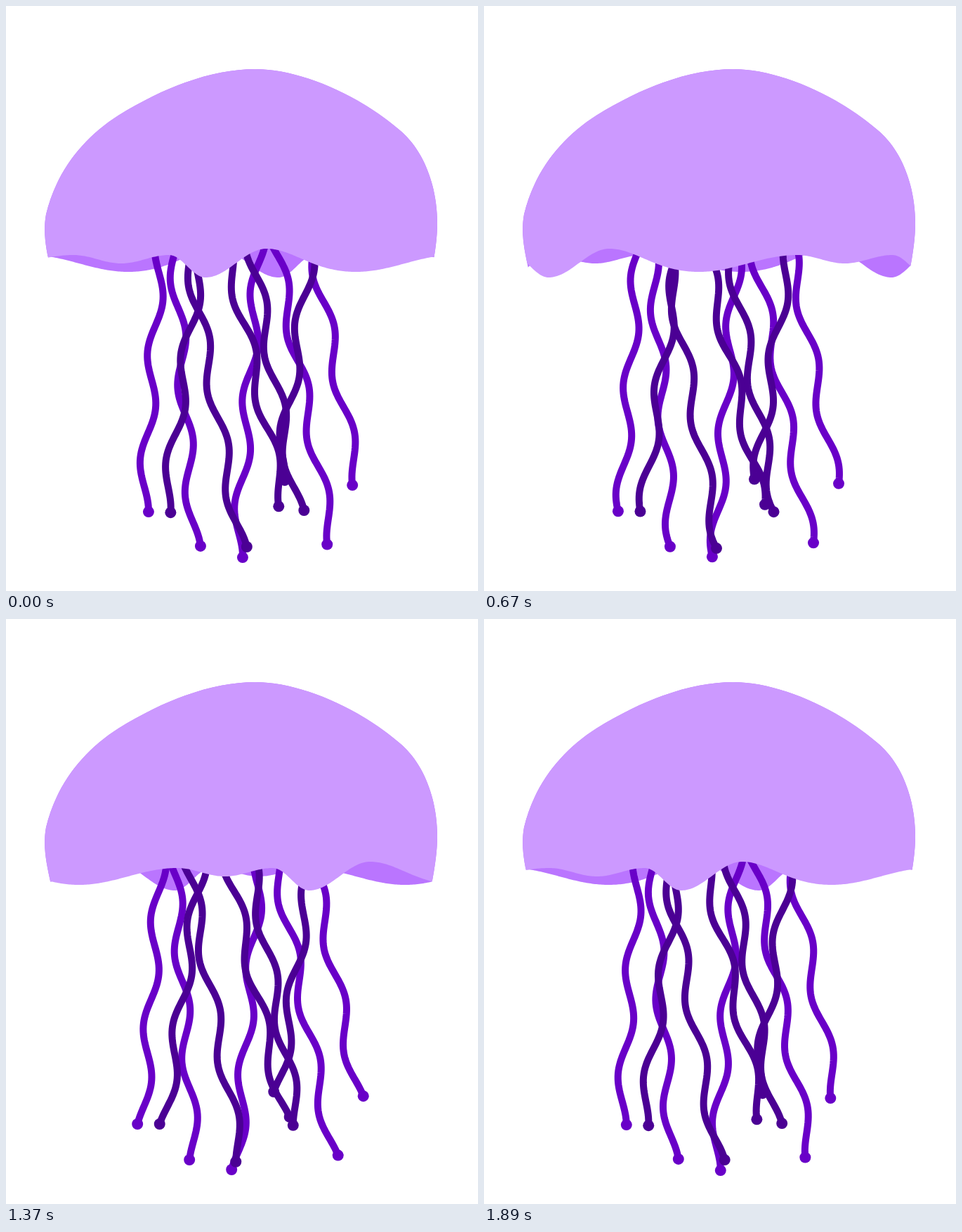
An HTML page for the animation above (1.94 s loop, 672 by 834 pixels).

```html
<!DOCTYPE html>
<html lang="en">
<head>
<meta charset="utf-8">
<title>Jellyfish</title>
<style>
  html, body { margin: 0; width: 100%; height: 100%; overflow: hidden; background: #fff; }
  svg { display: block; width: 672px; height: 834px; }
</style>
</head>
<body>
<svg viewBox="0 0 672 834">
  <defs>
    <clipPath id="dome">
      <path d="M355 90C420 90 505 128 563 179C600 212 614 265 614 310C614 330 611 352 606 378L603 392H67L64 378C58 350 52 325 57 297C72 235 110 188 160 156C235 110 300 90 355 90Z"/>
    </clipPath>
  </defs>
  <path id="back" clip-path="url(#dome)" fill="#ba75ff"/>
  <g id="tentacles" fill="none" stroke-width="10" stroke-linejoin="round"></g>
  <path id="front" clip-path="url(#dome)" fill="#cc99ff"/>
</svg>
<script>
const LOOP = 1940, LAST_POSE = 1890, FRAME = 100 / 3;
const BRIGHT = '#6900c8', DARK = '#4b0094';

// Hem profile: extremes of one repeat, [offset, y, skew of the slope leading there]
const HEM = [[0, 387], [87, 346], [214, 379, 0.07], [354, 355], [422, 367], [490, 355], [542, 387]];
const HEM_LENGTH = 542, HEM_START = 284, HEM_SPEED = 0.2885;

const AMPLITUDE = 8.5, WAVELENGTH = 153, SWAY_PERIOD = 952, TIP_LAG = 7 / 360;

// Axis end x, y, lean (dx per dy), swing direction, colour
const TENTACLES = [
  [194.5, 720.5, -0.068, 1, BRIGHT],
  [268.5, 770.5, 0.069, 1, BRIGHT],
  [328.5, 785.5, -0.073, 1, BRIGHT],
  [465.5, 766, 0.192, -1, BRIGHT],
  [501.5, 681.5, 0.19, -1, BRIGHT],
  [226, 721, -0.14, 1, DARK],
  [334.5, 772.5, 0.177, 1, DARK],
  [388.5, 675, -0.14, 1, DARK],
  [396.5, 711.5, 0.222, -1, DARK],
  [416, 720.5, 0.178, 1, DARK]
];

const byId = id => document.getElementById(id);

function add(parent, name, attributes) {
  const node = document.createElementNS('http://www.w3.org/2000/svg', name);
  for (const key in attributes) node.setAttribute(key, attributes[key]);
  return parent.appendChild(node);
}

const strands = TENTACLES.map(([x, y, lean, side, color]) => {
  const length = Math.hypot(1, lean);
  return {
    x, y, side,
    ux: lean / length, uy: 1 / length,
    reach: (y - 330) * length,
    line: add(byId('tentacles'), 'path', { stroke: color }),
    tip: add(byId('tentacles'), 'circle', { r: 8, fill: color })
  };
});

function hemY(offset) {
  const u = ((offset % HEM_LENGTH) + HEM_LENGTH) % HEM_LENGTH;
  const i = HEM.findIndex(point => point[0] > u);
  const [x0, y0] = HEM[i - 1], [x1, y1, skew = 0] = HEM[i];
  const angle = Math.PI * (u - x0) / (x1 - x0);
  const turn = angle + Math.PI * skew * Math.sin(angle);
  return y0 + (y1 - y0) * (1 - Math.cos(turn)) / 2;
}

function hemPath(heightAt) {
  let d = 'M40 80';
  for (let x = 40; x <= 632; x += 2) d += `L${x} ${heightAt(x).toFixed(2)}`;
  return d + 'L632 80Z';
}

function pointOn(strand, distance, cycle) {
  const phase = cycle - TIP_LAG - distance / WAVELENGTH;
  const swing = strand.side * AMPLITUDE * Math.cos(2 * Math.PI * phase);
  return [
    strand.x - strand.ux * distance + strand.uy * swing,
    strand.y - strand.uy * distance - strand.ux * swing
  ];
}

function draw(time) {
  const deepest = HEM_START - HEM_SPEED * time;
  const frontY = x => hemY(x - deepest);
  byId('front').setAttribute('d', hemPath(frontY));
  byId('back').setAttribute('d', hemPath(x => frontY(672 - x)));

  const cycle = time / SWAY_PERIOD;
  for (const strand of strands) {
    const points = [];
    for (let s = 0; s < strand.reach; s += 4) {
      points.push(pointOn(strand, s, cycle).map(v => v.toFixed(2)));
    }
    const [tipX, tipY] = points[0];
    strand.line.setAttribute('d', 'M' + points.join('L'));
    strand.tip.setAttribute('cx', tipX);
    strand.tip.setAttribute('cy', tipY);
  }
}

// The motion advances in thirtieths of a second and rests on its last pose
function poseTime(time) {
  return time >= LAST_POSE ? LAST_POSE : Math.min(55, Math.floor((time + 4) / FRAME)) * FRAME;
}

const start = performance.now();
function tick() {
  draw(poseTime((performance.now() - start) % LOOP));
  requestAnimationFrame(tick);
}
tick();
</script>
</body>
</html>
```
